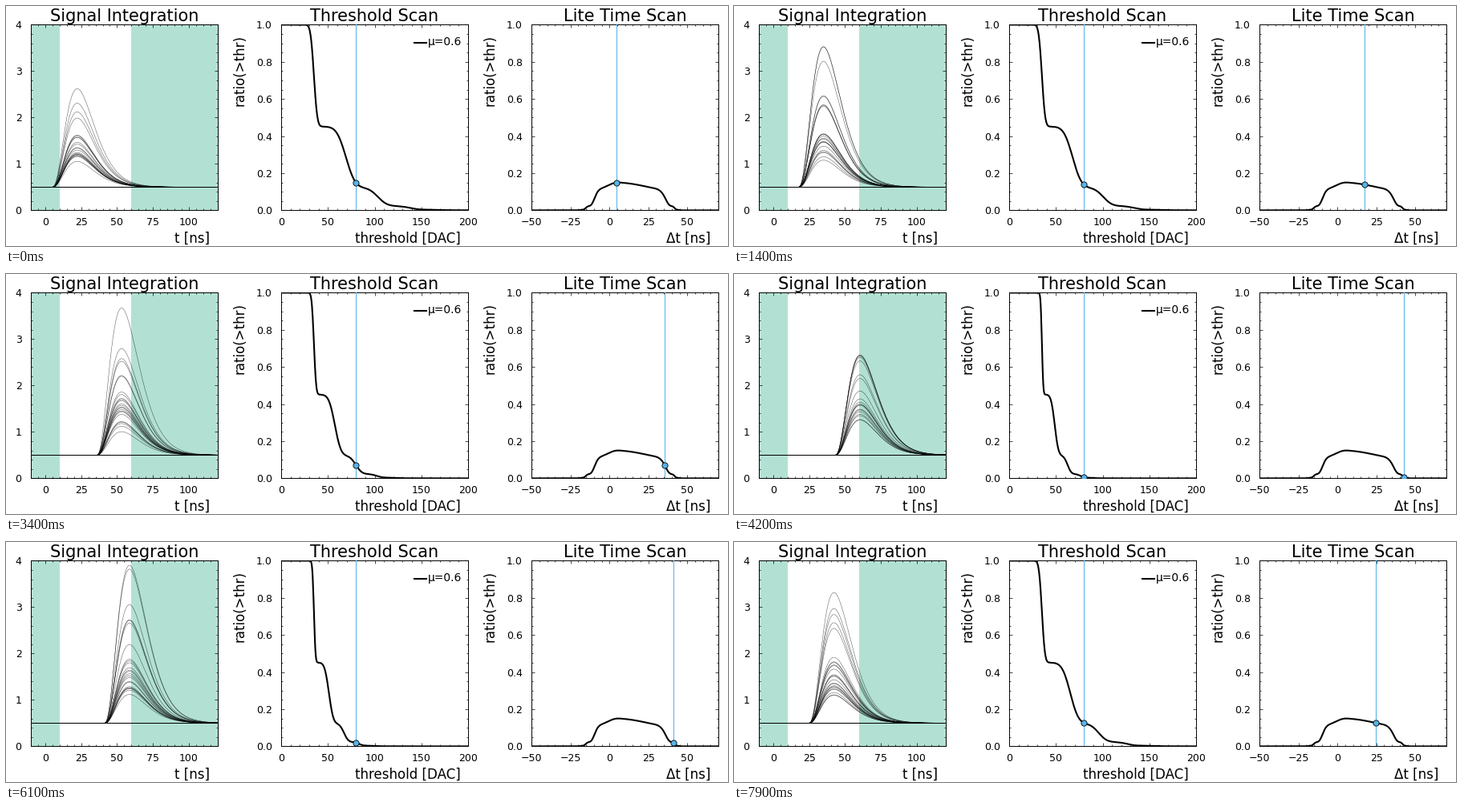
These frames come from a looping animation (900x300 px, 8000 ms). A matplotlib script:

```python
import math

import matplotlib.pyplot as plt
import numpy as np
from matplotlib.animation import FuncAnimation
from matplotlib.ticker import AutoMinorLocator, MultipleLocator

W, H, DPI = 900, 300, 100
FRAMES, INTERVAL = 80, 100
BLUE, GREEN = "#56b4e9", "#009e73"

MU, THRESHOLD = 0.6, 80
PEDESTAL, GAIN = 35, 34.9
NOISE, SPREAD = 2.9, 7.4
TAU, BASELINE = 5.9, 0.5
GATE = (8.5, 61.5)
EVENTS = 50
DT_START, DT_MAX, DT_STEP = 50 / 11, 50, 10 / 11
PEAK_FRAME = 50

plt.rcParams.update({"font.family": "DejaVu Sans", "axes.linewidth": 0.7})
erf = np.vectorize(math.erf)


def pulse(u):
    """Pulse shape of unit height, starting at u = 0."""
    x = np.maximum(u, 0) / TAU
    return (x / 3) ** 3 * np.exp(3 - x)


def charge(u):
    """Fraction of the pulse charge collected up to u."""
    x = np.maximum(u, 0) / TAU
    return 1 - np.exp(-x) * (1 + x + x**2 / 2 + x**3 / 6)


def ratio(threshold, dt):
    """Share of events above threshold for a Poisson photon count."""
    part = np.maximum(charge(GATE[1] - dt) - charge(GATE[0] - dt), 1e-3)
    level = (threshold - PEDESTAL) / part
    total = 0
    for k in range(9):
        weight = math.exp(-MU) * MU**k / math.factorial(k)
        sigma = math.hypot(NOISE, SPREAD if k else 0)
        total = total + weight * 0.5 * (1 - erf((level - k * GAIN) / (sigma * math.sqrt(2))))
    return total


def delay(i):
    if i <= PEAK_FRAME:
        return DT_START + DT_STEP * i
    return DT_MAX - DT_STEP * (i - PEAK_FRAME - 1)


def amplitudes(i):
    rng = np.random.default_rng(700 + i)
    n = rng.poisson(MU, EVENTS)
    return np.maximum(0.97 * n + 0.22 * np.sqrt(n) * rng.standard_normal(EVENTS), 0)


fig = plt.figure(figsize=(W / DPI, H / DPI), dpi=DPI, facecolor="white")


def label(x, y, text, size=12, **kw):
    return fig.text(x / W, 1 - y / H, text, fontsize=size, **kw)


def panel(left, title, xlabel, xlim, ylim, xstep, ystep):
    top, bottom, width = 23.4, 255.4, 232.8
    ax = fig.add_axes([left / W, 1 - bottom / H, width / W, (bottom - top) / H])
    ax.set(xlim=xlim, ylim=ylim)
    for axis, step in ((ax.xaxis, xstep), (ax.yaxis, ystep)):
        axis.set_major_locator(MultipleLocator(step))
        axis.set_minor_locator(AutoMinorLocator())
    ax.tick_params(which="both", direction="in", top=True, right=True, labelsize=9, width=0.5)
    ax.tick_params(which="major", length=3)
    ax.tick_params(which="minor", length=1.5)
    ax.tick_params(axis="x", pad=6.2)
    ax.tick_params(axis="y", pad=8.2)
    label(left + width / 2, 18.6, title, 15, ha="center", va="baseline")
    label(left + width - 9.6, 295.8, xlabel, ha="right", va="baseline")
    return ax


def ratio_label(x):
    label(x, 36, "ratio(>thr)", rotation=90, ha="center", va="top")


def cursor(ax, x):
    line = ax.axvline(x, color=BLUE, lw=0.75, zorder=3)
    (dot,) = ax.plot([x], [0], "o", ms=5.2, mfc=BLUE, mec="black", mew=0.6, zorder=4)
    return line, dot


sig = panel(31, "Signal Integration", "t [ns]", (-10, 120), (0, 4), 25, 1)
thr = panel(343.1, "Threshold Scan", "threshold [DAC]", (0, 200), (0, 1), 50, 0.2)
scan = panel(655.2, "Lite Time Scan", "Δt [ns]", (-50, 70), (0, 1), 25, 0.2)
ratio_label(292)
ratio_label(604)

for span in ((-10, 10), (60, 120)):
    sig.axvspan(*span, color=GREEN, alpha=0.3, lw=0)
t = np.linspace(-10, 120, 400)
traces = [sig.plot(t, 0 * t, color="black", lw=0.4, alpha=0.6)[0] for _ in range(EVENTS)]

levels = np.linspace(0, 200, 500)
(thr_curve,) = thr.plot(levels, 0 * levels, color="black", lw=1.5)
_, thr_dot = cursor(thr, THRESHOLD)
thr.plot([142.4, 155], [0.904, 0.904], color="black", lw=1.5)
label(526, 45.5, "μ=0.6", 10, ha="left", va="center")

delays = np.linspace(-50, 70, 400)
scan.plot(delays, ratio(THRESHOLD, delays), color="black", lw=1.5)
dt_line, dt_dot = cursor(scan, 0)


def update(i):
    dt = delay(i)
    shape = pulse(t - dt)
    for trace, a in zip(traces, amplitudes(i)):
        trace.set_ydata(BASELINE + a * shape)
    thr_curve.set_ydata(ratio(levels, dt))
    value = float(ratio(THRESHOLD, dt))
    thr_dot.set_data([THRESHOLD], [value])
    dt_dot.set_data([dt], [value])
    dt_line.set_xdata([dt, dt])
    dt_line.set_color("#999999" if dt > DT_MAX - 0.01 else BLUE)
    return [*traces, thr_curve, thr_dot, dt_line, dt_dot]


anim = FuncAnimation(fig, update, frames=FRAMES, interval=INTERVAL, repeat=True, repeat_delay=0)
plt.show()
```
